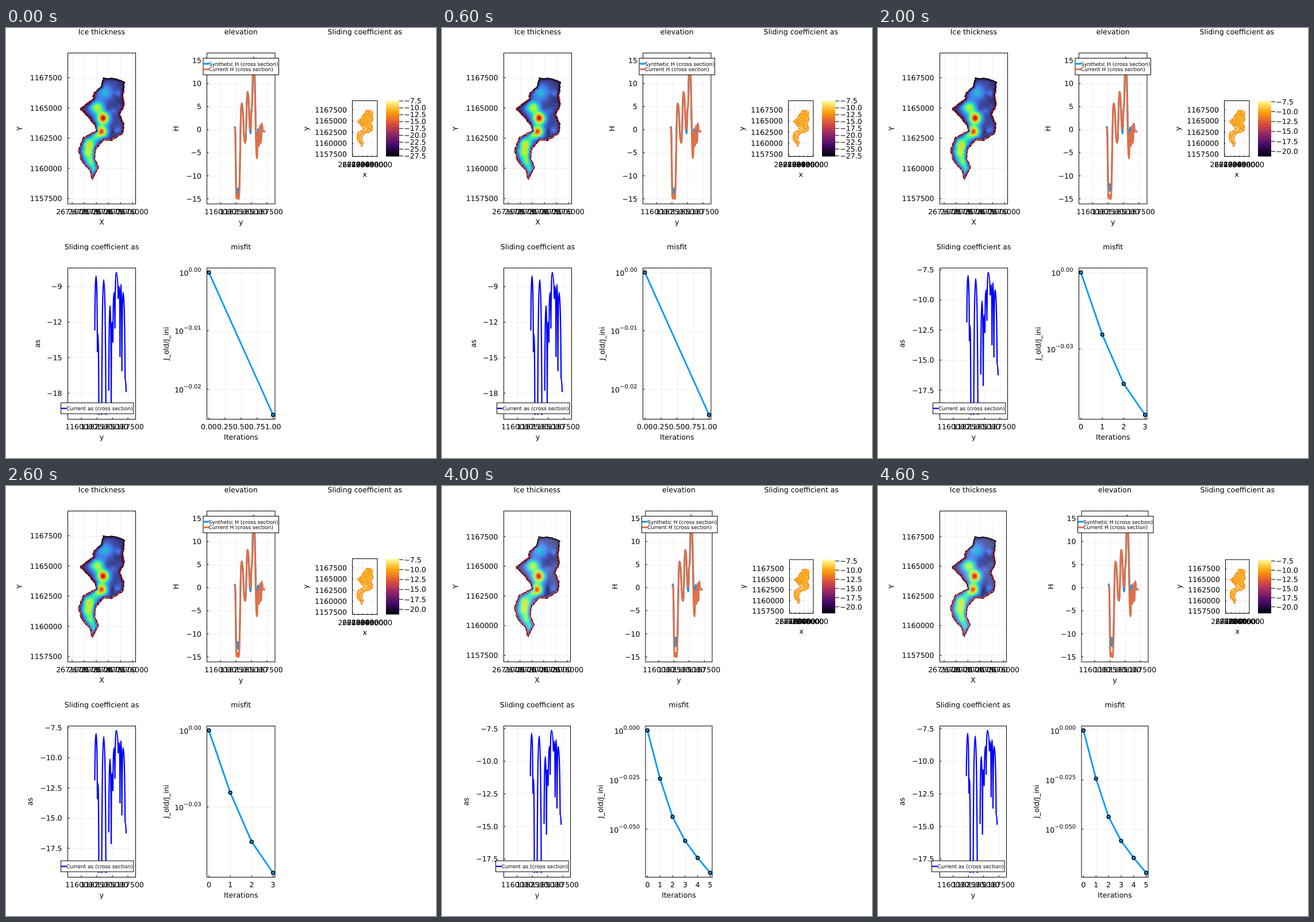
An HTML page with a canvas for the animation above (5 s loop, 748x748 px).

```html
<!DOCTYPE html>
<html lang="en">
<head>
<meta charset="utf-8">
<title>Glacier inversion</title>
<style>
  html, body { margin: 0; width: 100%; height: 100%; overflow: hidden; background: #fff; }
  canvas, svg { position: absolute; left: 0; top: 0; width: 748px; height: 748px; }
  text { font: 12.5px "DejaVu Sans", sans-serif; text-rendering: geometricPrecision; }
</style>
</head>
<body>
<canvas id="fields" width="748" height="748"></canvas>
<svg id="plots" viewBox="0 0 748 748"></svg>
<script>
const svg = document.getElementById("plots");
const ctx = document.getElementById("fields").getContext("2d");
const BLUE = "#009af9", ORANGE = "#e26f46";
const LEFT = 107.5, TOP = 43.5, BOTTOM = 306, TOP2 = 417.5, BOTTOM2 = 680.5;
const HIGH = 425.2, LOW = 673; // pixel extent of the data in the lower panels

// Two layouts alternate, depending on the width of the tick labels.
const WIDE = { right: 225.5, mid: [349.5, 468], scale: 1, mapTop: 86.5, small: [602.5, 126.5, 646, 223.5], ratio: 0.369 };
const NARROW = { right: 223.5, mid: [354, 470], scale: 0.9833, mapTop: 88, small: [604.5, 128, 646, 221.5], ratio: 0.358 };

// Per iteration: lower data limits and tick spacings
const STEPS = [
  { layout: WIDE, asLow: -19.84, asTick: 3, barLow: -27.7, powTick: 0.01, iterTick: 0.25 },
  { layout: NARROW, asLow: -19.19, asTick: 2.5, barLow: -22.75, powTick: 0.025, iterTick: 0.5 },
  { layout: WIDE, asLow: -19.55, asTick: 2.5, barLow: -21.3, powTick: 0.03, iterTick: 1 },
  { layout: NARROW, asLow: -20.64, asTick: 2, barLow: -21.1, powTick: 0.025, iterTick: 1 },
  { layout: NARROW, asLow: -18.56, asTick: 2.5, barLow: -21.8, powTick: 0.025, iterTick: 1 }
];
const MISFIT = [0, 0.0244, 0.0437, 0.0559, 0.0645, 0.0721];

// Key points of the curves; values below the axis run off its lower end
const SLIDING = [
  [[154.5, -12.7], [156.7, -8.1], [159, -14.5], [160, -13], [161.5, -30]],
  [[166.5, -30], [170, -8.4], [173.8, -30]],
  [[178.8, -17.8], [181, -10.6], [183, -18.9], [184.3, -12], [186, -13.7], [188, -9.5], [189.5, -12.5], [191.7, -7.8],
   [195.2, -10], [197, -9], [198.3, -14.9], [200, -8.8], [201.6, -16.1], [203.7, -9.5], [207.2, -16.8], [209, -17.9]]
];
const ELEVATION = [[397, 176], [398.3, 173], [401, 297], [403, 290], [404.8, 298], [410, 131], [416, 200],
  [420.4, 111], [425.3, 178], [427.5, 138], [430.7, 51], [436.6, 227], [438.5, 180],
  [440, 205], [442, 170], [443.3, 200], [445, 166], [447, 180], [451, 180]];

const range = n => Array.from({ length: n }, (_, i) => i);
const clamp = v => Math.max(0, Math.min(1, v));
const mix = (a, b, t) => a + (b - a) * t;
const bell = (d, w) => Math.exp(-((d / w) ** 2));
function seeded(seed) {
  return () => (seed = (seed * 16807) % 2147483647) / 2147483647;
}

// Colour maps
const palette = s => s.split(" ").map(hex => [0, 2, 4].map(i => parseInt(hex.slice(i, i + 2), 16)));
const TURBO = palette("30123b 4675ed 1bcfd4 61fc6c d1e834 fe9b2d d93806 7a0402");
const INFERNO = palette("000004 420a68 932667 dd513a fca50a fcffa4");
function colour(map, v) {
  const p = clamp(v) * (map.length - 1), i = Math.min(map.length - 2, Math.floor(p));
  return `rgb(${map[i].map((c, j) => Math.round(mix(c, map[i + 1][j], p - i)))})`;
}

// Glacier outline: key points joined by ragged edges
const CORNERS = [[170, 87], [190, 88], [206, 94], [203, 122], [206, 131], [198, 152], [205, 168], [203, 183],
  [184, 196], [170, 194], [156, 211], [154, 226], [161, 244], [150, 263], [146, 247], [131, 231], [127, 211],
  [135, 190], [158, 179], [156, 172], [141, 153], [129, 140], [151, 124], [153, 113], [165, 103]];
const jitter = seeded(41);
const outline = CORNERS.flatMap(([x, y], i) => {
  const [nx, ny] = CORNERS[(i + 1) % CORNERS.length];
  const n = Math.round(Math.hypot(nx - x, ny - y) / 3);
  return range(n).map(j => [mix(x, nx, j / n) + jitter() * 1.8 - 0.9, mix(y, ny, j / n) + jitter() * 1.8 - 0.9]);
});
const outlinePath = new Path2D("M" + outline.join("L") + "Z");
const edgeDistance = (x, y) => Math.min(...outline.map(([px, py]) => Math.hypot(px - x, py - y)));

// Ice thickness: x, y, radius, amount, then faint random mottling of the upper basin
const speck = seeded(7);
const BUMPS = [[169, 157, 9.5, 0.85], [166, 180, 9.5, 0.76], [159, 139, 10, 0.5], [145, 202, 9.5, 0.5],
  [143, 217, 9.5, 0.45], [148, 232, 9, 0.36], [152, 247, 8, 0.27], [172, 112, 13, 0.17], [155, 189, 8, 0.22]]
  .concat(range(30).map(() => [140 + speck() * 65, 90 + speck() * 100, 4 + speck() * 5, speck() * 0.13 - 0.06]));
function thickness(x, y, d) {
  const ice = BUMPS.reduce((sum, [bx, by, r, a]) => sum + a * bell(Math.hypot(x - bx, y - by), r), 0.07);
  return ice * clamp(0.1 + d / 6);
}

function sampleGlacier(step, paint) {
  const cells = [];
  for (let y = 85; y < 265; y += step)
    for (let x = 126; x < 209; x += step) {
      const cx = x + step / 2, cy = y + step / 2;
      if (ctx.isPointInPath(outlinePath, cx, cy)) cells.push([x, y, paint(cx, cy, edgeDistance(cx, cy))]);
    }
  return cells;
}
const iceCells = sampleGlacier(1, (x, y, d) => y > 183 && d < 1.5 ? "#fff" : colour(TURBO, thickness(x, y, d)));
const grain = seeded(977);
const slideCells = sampleGlacier(3, (x, y, d) => {
  const hole = grain() < (y > 170 && d > 3 ? 0.22 : 0.03);
  return hole ? "#fff" : colour(INFERNO, (d < 2.5 ? 0.72 : 0.8) + (grain() - 0.5) * 0.2);
});

function paintCells(cells, size) {
  for (const [x, y, fill] of cells) {
    ctx.fillStyle = fill;
    ctx.fillRect(x, y, size, size);
  }
}

function place(L, draw) {
  ctx.save();
  ctx.translate(115, L.mapTop);
  ctx.scale(L.scale, L.scale);
  ctx.translate(-115, -86.5);
  draw();
  ctx.restore();
}

function paintFields(L) {
  place(L, () => {
    paintCells(iceCells, 1.2);
    ctx.lineWidth = 1.6;
    ctx.strokeStyle = "#000";
    ctx.stroke(outlinePath);
    ctx.strokeStyle = "#f00";
    ctx.setLineDash([4, 3]);
    ctx.beginPath();
    ctx.rect(100, 108, 120, 170);
    ctx.clip();
    ctx.stroke(outlinePath);
  });
  const [x, y, , bottom] = L.small;
  ctx.save();
  ctx.translate(x, y);
  ctx.scale(L.ratio, L.ratio);
  ctx.translate(-LEFT, -TOP);
  place(L, () => {
    ctx.fillStyle = "#f9a01c";
    ctx.fill(outlinePath);
    paintCells(slideCells, 3.2);
  });
  ctx.restore();
  const bar = ctx.createLinearGradient(0, bottom, 0, y);
  range(6).forEach(i => bar.addColorStop(i / 5, colour(INFERNO, i / 5)));
  ctx.fillStyle = bar;
  ctx.fillRect(661, y, 23, bottom - y);
}

// SVG helpers
const text = (x, y, s, anchor = "middle", size = 12.5) =>
  `<text x="${x}" y="${y}" text-anchor="${anchor}" style="font-size:${size}px">${s}</text>`;
const sideways = (x, y, s) => `<g transform="translate(${x} ${y}) rotate(-90)">${text(0, 4, s)}</g>`;
const line = (x1, y1, x2, y2, stroke = "#000", width = 1) =>
  `<path d="M${x1} ${y1}L${x2} ${y2}" stroke="${stroke}" stroke-width="${width}"/>`;
const curve = (d, stroke, width) =>
  `<path d="${d}" fill="none" stroke="${stroke}" stroke-width="${width}" stroke-linejoin="round"/>`;

// Multiples of step between lo and hi, and their labels
function ticks(lo, hi, step) {
  const first = Math.ceil(lo / step - 1e-6);
  return range(Math.floor(hi / step + 1e-6) - first + 1).map(i => (first + i) * step);
}
const decimals = step => (String(step).split(".")[1] || "").length;
const label = (v, step) => v.toFixed(decimals(step)).replace(/^-(?=.*[1-9])/, "−").replace("-", "");

function axes([x0, y0, x1, y1], xs, ys, tick = 3) {
  ctx.fillStyle = "rgba(0,0,0,0.06)";
  let out = `<rect x="${x0}" y="${y0}" width="${x1 - x0}" height="${y1 - y0}" fill="none" stroke="#000"/>`;
  for (const x of xs) {
    ctx.fillRect(Math.round(x), y0, 1, y1 - y0);
    out += line(x, y1, x, y1 - tick);
  }
  for (const y of ys) {
    ctx.fillRect(x0, Math.round(y), x1 - x0, 1);
    out += line(x0, y, x0 + tick, y);
  }
  return out;
}
const xLabels = (xs, y, labels) => xs.map((x, i) => text(x, y, labels[i])).join("");
const yLabels = (x, ys, labels) => ys.map((y, i) => text(x, y + 4.5, labels[i], "end")).join("");
const headings = (x, top, title, axis) => text(x, top, title) + text(x, top + 331, axis);

function legend(x, y, w, h, rows, lineWidth) {
  return `<rect x="${x}" y="${y}" width="${w}" height="${h}" fill="#fff" stroke="#000"/>` +
    rows.map(([name, stroke], i) => {
      const cy = y + 9.7 * (i + 1);
      return line(x + 0.5, cy, x + 10, cy, stroke, lineWidth) + text(x + 9.8, cy + 3.3, name, "start", 9);
    }).join("");
}

// Joins points with segments built from the previous and the next point
const trace = (pts, segment) => pts.map((p, i) => i ? segment(...pts[i - 1], ...p) : "M" + p).join("");
const rounded = (px, py, x, y) => `C${(px + x) / 2} ${py} ${(px + x) / 2} ${y} ${x} ${y}`;
const spiky = (px, py, x, y) => `Q${mix(px, x, py > y ? 0.25 : 0.75)} ${Math.min(y, py)} ${x} ${y}`;

const northings = range(5).map(i => 1167500 - i * 2500);
const eastings = range(6).map(i => 2671000 + i * 1000);
const sections = range(4).map(i => 1160000 + i * 2500);

function iceThickness(L, mapX, mapY) {
  return axes([LEFT, TOP, L.right, BOTTOM], mapX, mapY) + xLabels(mapX, 324, eastings) +
    yLabels(97.5, mapY, northings) + headings((LEFT + L.right) / 2, 11, "Ice thickness", "X") + sideways(24, 175, "Y");
}

function elevation(L, k) {
  const [x0, x1] = L.mid, toX = x => x0 + (x - 349.5) * (x1 - x0) / 118.5;
  const heights = ticks(-15, 15, 5), xs = range(4).map(i => toX(373 + i * 27)), ys = heights.map(h => 176.8 - h * 8.02);
  const current = ELEVATION.map(([x, y]) => [toX(x), y]);
  const synthetic = ELEVATION.map(([x, y]) => [toX(x), y - (11 + 3.9 * k) * bell(x - 403, 3) +
    6 * bell(x - 425, 2) - (41 - 19 / (1 + k)) * bell(x - 437, 1.2)]);
  return axes([x0, TOP, x1, BOTTOM], xs, ys) + xLabels(xs, 324, sections) +
    yLabels(x0 - 9.5, ys, heights.map(h => label(h, 5))) +
    headings((x0 + x1) / 2, 11, "elevation", "y") + sideways(x0 - 53.5, 175, "H") +
    curve(trace(synthetic, rounded), BLUE, 3) + curve(trace(current, rounded), ORANGE, 3) +
    legend(x0 - 6.5, 52.5, 131.5, 29, [["Synthetic H (cross section)", BLUE], ["Current H (cross section)", ORANGE]], 3);
}

function slidingMap(L, k, mapX, mapY) {
  const [x0, y0, x1, y1] = L.small, { barLow } = STEPS[k], barHigh = 0.07 * k - 7.4;
  const xs = mapX.map(x => x0 + (x - LEFT) * L.ratio), ys = mapY.map(y => y0 + (y - TOP) * L.ratio);
  const bar = ticks(barLow, barHigh, 2.5).map(v => {
    const y = mix(y0, y1, (barHigh - v) / (barHigh - barLow));
    return line(684, y, 691, y) + text(692.3, y + 4.5, label(v, 2.5), "start");
  });
  return axes(L.small, xs, ys, 1.5) + xLabels(xs, y1 + 18, eastings) + yLabels(x0 - 9.5, ys, northings) +
    text((x0 + x1) / 2, 11, "Sliding coefficient as") + text((x0 + x1) / 2, y1 + 35, "x") +
    sideways(x0 - 80.5, (y0 + y1) / 2, "y") + bar.join("");
}

function slidingSection(L, k) {
  const { asLow, asTick } = STEPS[k], asHigh = 0.04 * k - 7.8;
  const toX = x => LEFT + (x - LEFT) * L.scale, toY = v => mix(HIGH, LOW, (asHigh - v) / (asHigh - asLow));
  const values = ticks(asLow, asHigh + 0.3, asTick).reverse();
  const xs = range(4).map(i => toX(131 + i * 27)), ys = values.map(toY);
  // Each iteration lifts the curve towards its upper limit.
  const lifted = v => asHigh + (v + 7.8) * 0.92 ** k;
  const curves = SLIDING.map(part => trace(part.map(([x, v]) => [toX(x), Math.min(LOW, toY(lifted(v)))]), spiky));
  return axes([LEFT, TOP2, L.right, BOTTOM2], xs, ys) + xLabels(xs, 698, sections) +
    yLabels(97.5, ys, values.map(v => label(v, asTick))) +
    headings((LEFT + L.right) / 2, 385, "Sliding coefficient as", "y") +
    sideways(decimals(asTick) ? 42 : 55, 549, "as") + curve(curves.join(""), "#00f", 2.2) +
    legend(L.right - 130, 652, 126.5, 19, [["Current as (cross section)", "#00f"]], 2.2);
}

function misfit(L, k) {
  const { powTick, iterTick } = STEPS[k], [x0, x1] = L.mid, n = k + 1;
  const toX = i => mix(x0 + 3.4, x1 - 3.4, i / n), toY = v => mix(HIGH, LOW, v / MISFIT[n]);
  const powers = ticks(0, MISFIT[n], powTick), iterations = ticks(0, n, iterTick);
  const xs = iterations.map(toX), ys = powers.map(toY);
  const points = range(n + 1).map(i => [toX(i), toY(MISFIT[i])]);
  const power = v => `10<tspan dy="-7" style="font-size:10px">${label(-v, powTick)}</tspan>`;
  return axes([x0, TOP2, x1, BOTTOM2], xs, ys) + xLabels(xs, 698, iterations.map(i => label(i, iterTick))) +
    powers.map((v, i) => text(x0 - 9.8, ys[i] + 5.7, power(v), "end")).join("") +
    headings((x0 + x1) / 2, 385, "misfit", "Iterations") + sideways(L === WIDE ? 279 : 275.5, 549, "J_old/J_ini") +
    curve("M" + points.join("L"), BLUE, 2.8) +
    points.map(([x, y]) => `<circle cx="${x}" cy="${y}" r="2.9" fill="${BLUE}" stroke="#000" stroke-width="1.5"/>`).join("");
}

function render(k) {
  const L = STEPS[k].layout;
  const mapX = range(6).map(i => 115 + i * 21 * L.scale);
  const mapY = range(5).map(i => L.mapTop + i * 52.5 * L.scale);
  ctx.clearRect(0, 0, 748, 748);
  svg.innerHTML = iceThickness(L, mapX, mapY) + elevation(L, k) + slidingMap(L, k, mapX, mapY) +
    slidingSection(L, k) + misfit(L, k);
  paintFields(L);
}

let shown = -1;
const start = performance.now();
function tick() {
  const k = Math.floor((performance.now() - start) / 1000) % STEPS.length;
  if (k !== shown) render(shown = k);
  requestAnimationFrame(tick);
}
tick();
</script>
</body>
</html>
```
